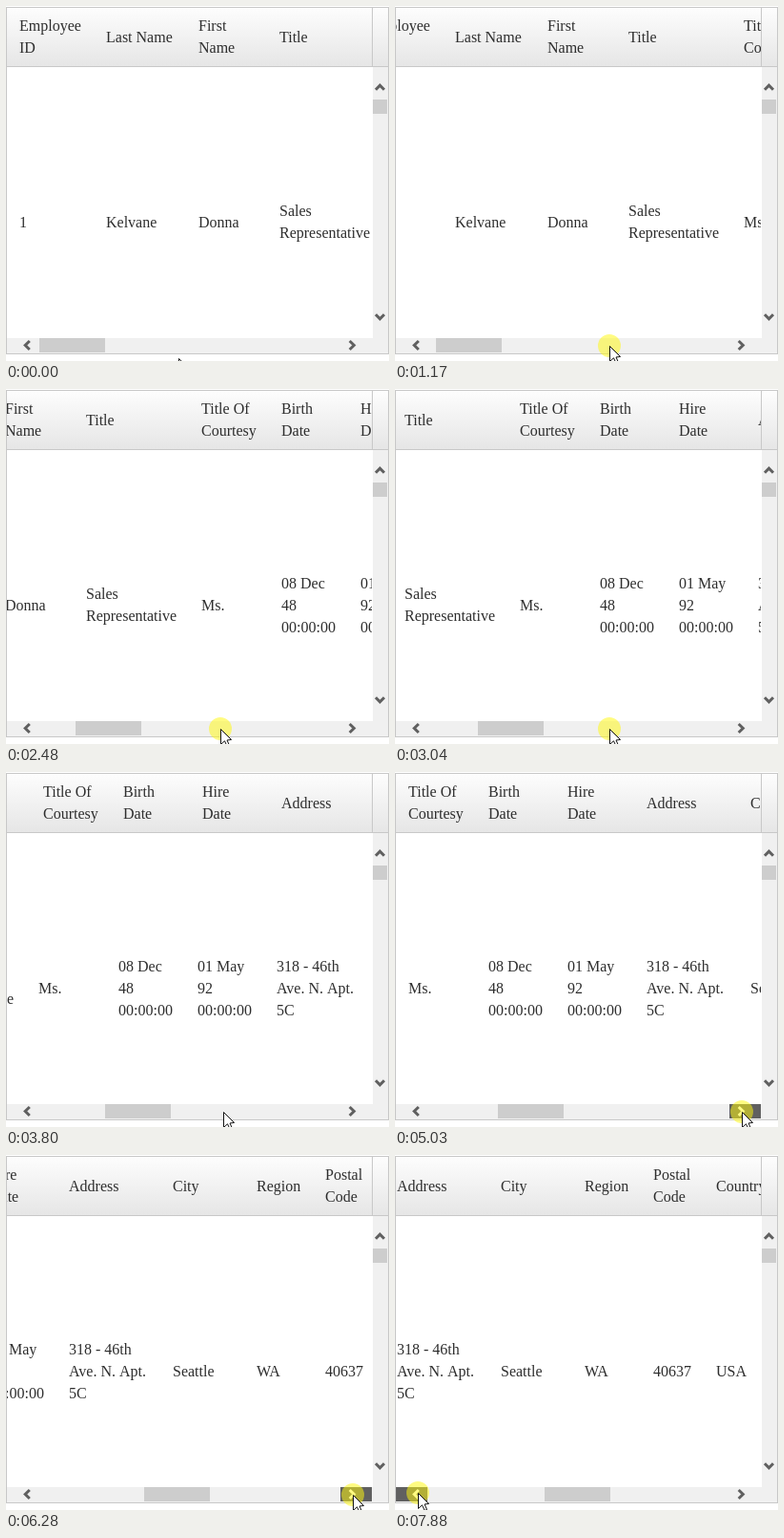
Write an HTML page with a canvas that moves like this. It is 402x372 px and loops after 8000 ms.

```html
<!DOCTYPE html>
<html lang="en">
<head>
<meta charset="utf-8">
<title>Scrolling employee grid</title>
<style>
html, body { margin: 0; width: 100%; height: 100%; overflow: hidden; background: #fff; }
canvas { display: block; width: 402px; height: 372px; }
</style>
</head>
<body>
<canvas id="stage" width="402" height="372"></canvas>
<script>
const ctx = document.getElementById('stage').getContext('2d');
const LOOP = 8000;
const BEAT = 78; // time between repeated scroll steps
const LINE = 23;
const DARK = '#606060', EDGE = '#c8c8c8';

// x, header, cell; "|" breaks the line
const columns = [
  [14, 'Employee|ID', '1'],
  [105, 'Last Name', 'Kelvane'],
  [202, 'First|Name', 'Donna'],
  [287, 'Title', 'Sales|Representative'],
  [408, 'Title Of|Courtesy', 'Ms.'],
  [492, 'Birth|Date', '08 Dec|48|00:00:00'],
  [575, 'Hire|Date', '01 May|92|00:00:00'],
  [658, 'Address', '318 - 46th|Ave. N. Apt.|5C'],
  [767, 'City', 'Seattle'],
  [855, 'Region', 'WA'],
  [927, 'Postal|Code', '40637'],
  [993, 'Country', 'USA']
];

// A press jumps to its first offset, then repeats along the path of [time, offset]
const presses = [
  { start: 770, end: 3800, button: 'track', first: 10,
    path: [[1000, 20], [1858, 139], [3028, 277], [3730, 374]] },
  { start: 4730, end: 6880, button: 'right', first: 394,
    path: [[5030, 394], [5576, 496], [6278, 592], [6824, 666]] },
  { start: 7880, end: LOOP, button: 'left', first: 656, path: [[LOOP, 656]] }
];

// Pointer moves: start, end, x, y
const moves = [
  [0, 540, 225, 356], [3720, 3800, 228, 356], [4030, 4500, 364, 356], [7030, 7650, 24, 354]
];

function along(path, t) {
  const i = path.findIndex(p => p[0] > t);
  if (i < 0) return path[path.length - 1][1];
  if (i === 0) return path[0][1];
  const [t0, v0] = path[i - 1], [t1, v1] = path[i];
  return v0 + (v1 - v0) * (t - t0) / (t1 - t0);
}

function scrollAt(t) {
  const press = presses.filter(p => t >= p.start).pop();
  if (!press) return { head: 0, body: 0 };
  const { path, first } = press;
  const begin = path[0][0];
  if (t < begin) return { head: first, body: first };
  const n = Math.floor((t - begin) / BEAT);
  const body = along(path, begin + n * BEAT);
  const before = along(path, begin + (n - 1) * BEAT);
  // The header trails by half a step on every other beat
  return { body, head: n % 2 ? (body + before) / 2 : body };
}

function pointerAt(t) {
  let x = 181, y = 369;
  for (const [from, to, toX, toY] of moves) {
    const k = Math.min(1, Math.max(0, (t - from) / (to - from)));
    x += (toX - x) * k;
    y += (toY - y) * k;
  }
  return [Math.round(x), Math.round(y)];
}

function box(x, y, w, h, fill) {
  ctx.fillStyle = fill;
  ctx.fillRect(x, y, w, h);
}

function textRow(part, offset, middle, top, height) {
  ctx.save();
  ctx.beginPath();
  ctx.rect(1, top, 383, height);
  ctx.clip();
  ctx.fillStyle = '#2e2e2e';
  ctx.font = '16px "Liberation Serif", "Times New Roman", serif';
  for (const col of columns) {
    const lines = col[part].split('|');
    const y = Math.floor(middle - (lines.length - 1) * LINE / 2);
    lines.forEach((s, i) => ctx.fillText(s, col[0] - offset, y + i * LINE));
  }
  ctx.restore();
}

// Chevron with its tip towards (dx, dy)
function chevron(x, y, dx, dy, color) {
  const s = 2.3, w = 4.5;
  ctx.strokeStyle = color;
  ctx.lineWidth = 3;
  ctx.beginPath();
  ctx.moveTo(x - dx * s + dy * w, y - dy * s + dx * w);
  ctx.lineTo(x + dx * s, y + dy * s);
  ctx.lineTo(x - dx * s - dy * w, y - dy * s - dx * w);
  ctx.stroke();
}

function header(offset) {
  const g = ctx.createLinearGradient(0, 2, 0, 63);
  g.addColorStop(0, '#fdfdfd');
  g.addColorStop(1, '#e6e6e6');
  box(1, 2, 400, 61, g);
  box(0, 63, 402, 1, EDGE);
  box(384, 2, 1, 61, EDGE);
  textRow(1, offset, 38, 2, 61);
}

function arrowButton(x, arrowX, dx, pressed) {
  if (pressed) box(x, 348, 33, 15, DARK);
  chevron(arrowX, 355.5, dx, 0, pressed ? '#fff' : DARK);
}

function scrollbars(offset, button) {
  const bar = '#f0f0f0', thumb = '#cdcdcd';
  box(385, 64, 16, 300, bar);
  box(1, 348, 384, 16, bar);
  box(385, 98, 15, 15, thumb);
  box(35 + Math.round(offset * 0.186), 348, 69, 15, thumb);
  chevron(392.5, 85.5, 0, -1, DARK);
  chevron(392.5, 325.5, 0, 1, DARK);
  arrowButton(1, 22.5, -1, button === 'left');
  arrowButton(351, 363, 1, button === 'right');
}

function highlight(x, y) {
  ctx.fillStyle = 'rgba(255, 247, 15, 0.52)';
  ctx.beginPath();
  ctx.arc(x, y, 12, 0, Math.PI * 2);
  ctx.fill();
}

function pointer(x, y) {
  const shape = [[0, 0], [0, 16], [4, 12.3], [6.6, 18], [9, 17], [6.5, 11.5], [11, 11]];
  ctx.beginPath();
  shape.forEach(([px, py]) => ctx.lineTo(x + px + 0.5, y + py + 0.5));
  ctx.closePath();
  ctx.fillStyle = '#fff';
  ctx.fill();
  ctx.strokeStyle = '#111';
  ctx.lineWidth = 1;
  ctx.stroke();
}

function draw(t) {
  const scroll = scrollAt(t);
  const head = Math.round(scroll.head), body = Math.round(scroll.body);
  const [x, y] = pointerAt(t);
  const press = presses.find(p => t >= p.start && t < p.end);

  box(0, 0, 402, 372, '#fff');
  header(head);
  textRow(2, body, 232, 64, 284);
  scrollbars(head, press && press.button);
  ctx.strokeStyle = EDGE;
  ctx.lineWidth = 1;
  ctx.strokeRect(0.5, 1.5, 401, 363);
  if (press) highlight(x, y);
  pointer(x, y);
}

const start = performance.now();
function loop() {
  draw((performance.now() - start) % LOOP);
  requestAnimationFrame(loop);
}
loop();
</script>
</body>
</html>
```
